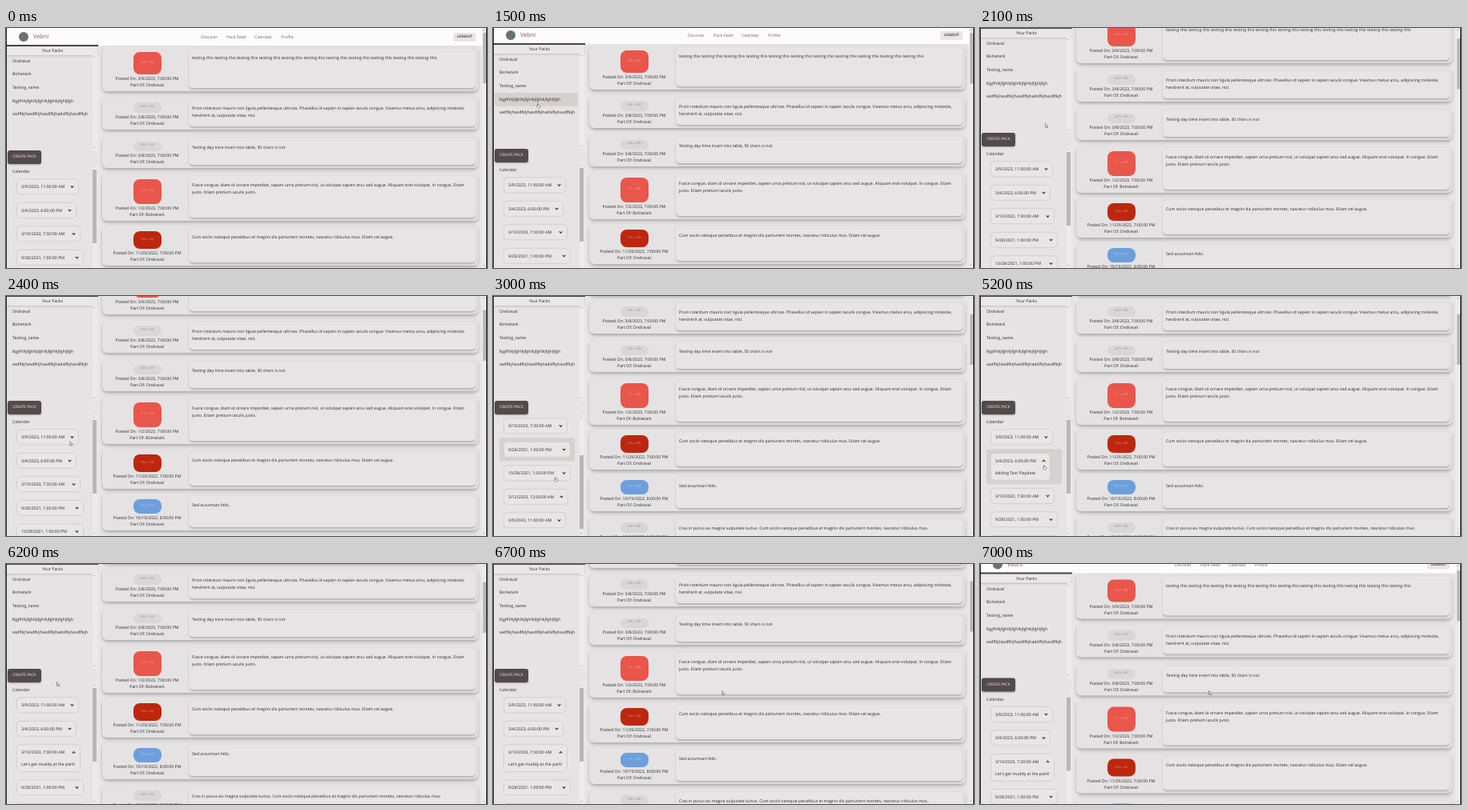
Animation, 600 px wide and 300 px high, one loop 7100 ms. Source, as an HTML page:

```html
<!DOCTYPE html>
<html lang="en">
<head>
<meta charset="utf-8">
<title>Pack feed</title>
<style>
html, body { margin: 0; width: 100%; height: 100%; overflow: hidden; background: #e8e5e6; }
#stage { position: relative; width: 600px; height: 300px; overflow: hidden; background: #e8e5e6;
  font: 5.2px/8.4px "Open Sans", "Noto Sans", sans-serif; color: #2b2728;
  text-rendering: geometricPrecision; cursor: default; }
#stage div { position: absolute; box-sizing: border-box; }
.text { white-space: nowrap; }
.center { text-align: center; }
.header { background: #fdfcfc; }
.header .text { color: #6d6162; }
.header .brand { font-size: 7.3px; color: #8c5553; }
.header .logout { background: #e8e5e5; border-radius: 2px; }
.header .logout .text { color: #262222; font-size: 4.6px; font-weight: 600; }
.card { border-radius: 6px; background: #e5e2e3;
  box-shadow: 0 3px 4px -1px rgba(0,0,0,.24), 0 1px 5px rgba(0,0,0,.09); }
.panel { border-radius: 5px; background: #e7e4e5;
  box-shadow: 0 2.5px 3px -1px rgba(0,0,0,.24), 0 0 3px rgba(0,0,0,.07); }
.photo { border-radius: 8px; font-size: 3.8px; }
.sidebar { background: #e6e3e4; }
.rule { background: #494345; }
.title { background: #eae7e8; box-shadow: 0 1px 2px rgba(0,0,0,.18); }
.create { background: #524a4b; border-radius: 3px; box-shadow: 0 1px 2px rgba(0,0,0,.3); }
.create .text { color: #f7f4f4; font-size: 4.77px; }
.hover { background: #d6d0ce; border-radius: 3px; }
.event { border: .7px solid #d3cfd0; border-radius: 5px; background: #e8e5e6; overflow: hidden; }
.chevron { width: 3px; height: 3px; border: solid #2b2728; border-width: 0 .9px .9px 0; }
.track { background: #eceaea; }
.thumb { background: #b9b6b7; }
.arrow { width: 0; height: 0; border: 1.6px solid transparent; }
.up { border-bottom-color: #777; border-top-width: 0; }
.down { border-top-color: #777; border-bottom-width: 0; }
.edge { background: #1d1a1b; }
#cursor { position: absolute; left: 0; top: 0; width: 6px; height: 8px; overflow: visible; }
#cursor path { fill: #fff; stroke: #55504f; stroke-width: .6; stroke-linejoin: round; }
</style>
</head>
<body>
<div id="stage"></div>
<script>
const LOOP = 7100, STEP = 100, HEADER = 22, HOVER_LAG = 150;
const ROW = 29.5, DETAIL = 14.5, ROWS_TOP = 161.3, CALENDAR_TOP = 148.5;
const stage = document.getElementById("stage");

function box(parent, cls, x, y, w, h) {
  const node = document.createElement("div");
  node.className = cls;
  Object.assign(node.style, { left: x + "px", top: y + "px" });
  if (w !== undefined) node.style.width = w + "px";
  if (h !== undefined) node.style.height = h + "px";
  parent.append(node);
  return node;
}

// y is the visual middle of the first line
function text(parent, content, x, y, cls = "") {
  const node = box(parent, "text " + cls, x, y - 4.5);
  node.innerText = content;
  return node;
}

function centered(parent, content, x, y, w) {
  const node = text(parent, content, x, y, "center");
  node.style.width = w + "px";
  return node;
}

function scrollbar(parent, x, y, w, h, thumbSize) {
  const bar = box(parent, "track", x, y, w, h);
  box(bar, "arrow up", w / 2 - 1.6, 2);
  box(bar, "arrow down", w / 2 - 1.6, h - 4);
  return thumbSize && box(bar, "thumb", .5, 6, w - 1, thumbSize);
}

// Page: header and feed
const page = box(stage, "page", 0, 0, 600, 400);

const header = box(page, "header", 0, 0, 595, HEADER);
const logo = box(header, "logo", 16, 5, 12, 12);
Object.assign(logo.style, { background: "#6c716d", borderRadius: "50%" });
text(header, "Vebni", 34, 11.5, "brand");
[["Discover", 243], ["Pack Feed", 275], ["Calendar", 310], ["Profile", 343]]
  .forEach(([label, x]) => text(header, label, x, 11.5));
centered(box(header, "logout", 558, 5.5, 28, 11.5), "LOGOUT", 0, 5.7, 28);

const RED = "#e9564b", GREY = "#d9d6d7";
const PACK_A = "Ondraval", PACK_B = "Bolnetark";
const posts = [
  [30, 28, RED, "123 x 100", "3/9/2023, 7:00:00 PM", PACK_A, Array(11).fill("testing this").join(" ")],
  [93, 13, GREY, "245 x 100", "3/8/2023, 7:00:00 PM", PACK_A,
    "Proin interdum mauris non ligula pellentesque ultrices. Phasellus id sapien in sapien iaculis congue. Vivamus metus arcu, adipiscing molestie,\nhendrerit at, vulputate vitae, nisl."],
  [141.5, 12.5, GREY, "245 x 100", "3/8/2023, 7:00:00 PM", PACK_A, "Testing day time insert into table, 50 chars is not"],
  [189, 31, RED, "111 x 100", "1/2/2023, 7:00:00 PM", PACK_B,
    "Fusce congue, diam id ornare imperdiet, sapien urna pretium nisl, ut volutpat sapien arcu sed augue. Aliquam erat volutpat. In congue. Etiam\njusto. Etiam pretium iaculis justo."],
  [254, 22, "#bd270e", "194 x 100", "11/29/2022, 7:00:00 PM", PACK_A,
    "Cum sociis natoque penatibus et magnis dis parturient montes, nascetur ridiculus mus. Etiam vel augue."],
  [310, 18, "#6d9fdc", "191 x 100", "10/19/2022, 8:00:00 PM", PACK_A, "Sed accumsan felis."],
  [363, 13, GREY, "239 x 100", "10/12/2022, 8:00:00 PM", PACK_A,
    "Cras in purus eu magna vulputate luctus. Cum sociis natoque penatibus et magnis dis parturient montes, nascetur ridiculus mus."]
];
for (const [top, height, color, size, date, pack, body] of posts) {
  const card = box(page, "card", 120, top - 7, 469, height + 28);
  const photo = box(card, "photo", 38.5, 7, 35, height);
  photo.style.background = color;
  centered(photo, size, 0, height / 2 + .2, 35).style.color = color === GREY ? "#8d898a" : "rgba(255,255,255,.5)";
  centered(card, "Posted On: " + date, 6, height + 12, 100);
  centered(card, "Part Of: " + pack, 6, height + 20.2, 100);
  const panel = box(card, "panel", 108, 3, 358, height + 21);
  text(panel, body, 4, 11.7);
}
page.append(header);

// Sidebar
const sidebar = box(stage, "sidebar", 0, 0, 114, 300);
box(sidebar, "title", 0, 0, 114, 11.5);
centered(sidebar, "Your Packs", 1, 6.8, 114);
box(sidebar, "rule", 0, -.8, 114.5, 1.6);
const packHover = box(sidebar, "hover", 2, 0, 104, 16.5);
const packs = [PACK_A, PACK_B, "Testing_name", "lkjgfhlkjfghlkjfghlkjfglhkjfghljfgh",
  "asdflkjhasdfkljhasdlfkjhadslfkjhasdflkjh"];
const packTop = i => 11.2 + i * 16.55;
packs.forEach((name, i) => text(sidebar, name, 8, packTop(i) + 8.2));
scrollbar(sidebar, 107.5, 12, 6, 119);
centered(box(sidebar, "create", 2, 131, 42, 17), "CREATE PACK", 0, 8.6, 42);

const calendar = box(sidebar, "calendar", 0, CALENDAR_TOP, 107, 300 - CALENDAR_TOP);
calendar.style.overflow = "hidden";
const agenda = box(calendar, "agenda", 0, 0, 107, 240);
text(agenda, "Calendar", 8, 157.3 - CALENDAR_TOP);
const eventHover = box(agenda, "hover", 8, 0, 94, ROW);
const events = [
  ["3/9/2023, 11:00:00 AM", 78, "Adding Test Playdate"],
  ["3/4/2023, 6:00:00 PM", 74.5, "Adding Test Playdate"],
  ["3/10/2023, 7:30:00 AM", 80, "Let's get muddy at the park!"],
  ["9/28/2021, 1:00:00 PM", 84],
  ["10/28/2021, 1:00:00 PM", 84],
  ["3/12/2023, 12:00:00 AM", 80.5],
  ["3/9/2023, 11:00:00 AM", 78]
].map(([date, width, note]) => {
  const node = box(agenda, "event", 13, 0, width, 20.5);
  text(node, date, 5, 10);
  if (note) text(node, note, 5, 25.3);
  return { node, chevron: box(node, "chevron", width - 10.8, 7.8) };
});
const calendarThumb = scrollbar(sidebar, 107.5, CALENDAR_TOP, 6, 300 - CALENDAR_TOP, 92);

const pageThumb = scrollbar(stage, 594, 0, 6, 300, 63);
box(stage, "edge", 0, 0, 1, 300);
box(stage, "edge", 599, 0, 1, 300);

stage.insertAdjacentHTML("beforeend", '<svg id="cursor"><path/></svg>');
const cursor = document.getElementById("cursor");
const cursorPath = cursor.firstChild;
const ARROW = "M.5 .5V5.2L1.7 4.2L2.5 6L3.3 5.7L2.6 3.9H4Z";
const HAND = "M1.4 .8Q1.9 .2 2.3 .8V2.6L4.4 3.1Q4.9 3.3 4.8 3.9L4.4 6H2L.3 3.9Q.4 3.2 1.4 3.7Z";

// Each entry: time, then one or more values
const tracks = {
  scroll: [[0, 0], [1400, 0], [1500, 2], [1600, 14], [1700, 24], [1800, 27], [2000, 27], [2100, 35],
    [2200, 48], [2300, 53], [2400, 56], [2500, 68], [2600, 78], [2700, 80],
    [6600, 80], [6700, 74], [6800, 56], [6900, 30], [7000, 10.5], [7100, 0]],
  agenda: [[2700, 0], [3000, 73], [3100, 73], [3500, 4.5], [4300, 4.5], [4400, 0]],
  open: [[3900, 0, 0, 0], [4100, 1, 0, 0], [4700, 1, 0, 0], [4900, 0, 1, 0],
    [5600, 0, 1, 0], [5800, 0, 0, 1]],
  cursor: [[100, 300, 165], [400, 200, 120], [800, 112, 60], [900, 80, 47], [1200, 60, 80],
    [1500, 56, 97], [1700, 70, 112], [2100, 83, 122], [2600, 80, 226], [3000, 78, 229],
    [3500, 82, 200], [3800, 84, 176], [4400, 84.5, 176], [4700, 80, 216], [5200, 80, 214],
    [5500, 85, 248], [5800, 84, 243], [6000, 66, 152], [6200, 65, 150], [6600, 287, 161]]
};

function sample(track, t) {
  const next = track.findIndex(key => key[0] > t);
  if (next === 0) return track[0].slice(1);
  if (next < 0) return track[track.length - 1].slice(1);
  const a = track[next - 1], b = track[next], k = (t - a[0]) / (b[0] - a[0]);
  return a.slice(1).map((v, i) => v + (b[i + 1] - v) * k);
}

function poseAt(t) {
  const [scroll] = sample(tracks.scroll, t), [shift] = sample(tracks.agenda, t);
  const open = sample(tracks.open, t), [x, y] = sample(tracks.cursor, t);
  let top = ROWS_TOP - CALENDAR_TOP;
  const rows = events.map((_, i) => {
    const row = { top, height: ROW + DETAIL * (open[i] || 0), open: open[i] > .5 };
    top += row.height;
    return row;
  });
  return { scroll, shift, rows, x, y, side: Math.max(0, HEADER - scroll) };
}

function hovered({ x, y, side, shift, rows }) {
  const local = y - side, inAgenda = local - CALENDAR_TOP + shift;
  return {
    pack: x > 2 && x < 106 ? packs.findIndex((_, i) => local >= packTop(i) && local < packTop(i + 1)) : -1,
    event: x > 8 && x < 102 && local > CALENDAR_TOP
      ? rows.findIndex(r => inAgenda >= r.top && inAgenda < r.top + r.height) : -1
  };
}

const move = (node, x, y) => { node.style.transform = `translate(${x}px, ${y}px)`; };
const show = (node, on) => { node.style.visibility = on ? "visible" : "hidden"; };

function draw(t) {
  const pose = poseAt(t), hover = hovered(poseAt(t - HOVER_LAG));
  move(page, 0, -pose.scroll);
  move(sidebar, 0, pose.side);
  move(agenda, 0, -pose.shift);
  move(pageThumb, 0, pose.scroll * .21);
  move(calendarThumb, 0, pose.shift * .605);

  pose.rows.forEach((row, i) => {
    const { node, chevron } = events[i];
    move(node, 0, row.top + 4.5);
    node.style.height = row.height - 9 + "px";
    chevron.style.transform = row.open ? "translateY(1.4px) rotate(225deg)" : "rotate(45deg)";
  });

  show(packHover, hover.pack >= 0);
  if (hover.pack >= 0) move(packHover, 0, packTop(hover.pack));
  show(eventHover, hover.event >= 0);
  if (hover.event >= 0) {
    const row = pose.rows[hover.event];
    move(eventHover, 0, row.top);
    eventHover.style.height = row.height + "px";
  }

  show(cursor, t >= STEP);
  cursorPath.setAttribute("d", hover.pack >= 0 || hover.event >= 0 ? HAND : ARROW);
  move(cursor, pose.x - 2, pose.y - 3);
}

function tick() {
  const now = performance.now() + 20;
  draw(Math.floor(now % LOOP / STEP) * STEP);
  requestAnimationFrame(tick);
}
tick();
</script>
</body>
</html>
```
